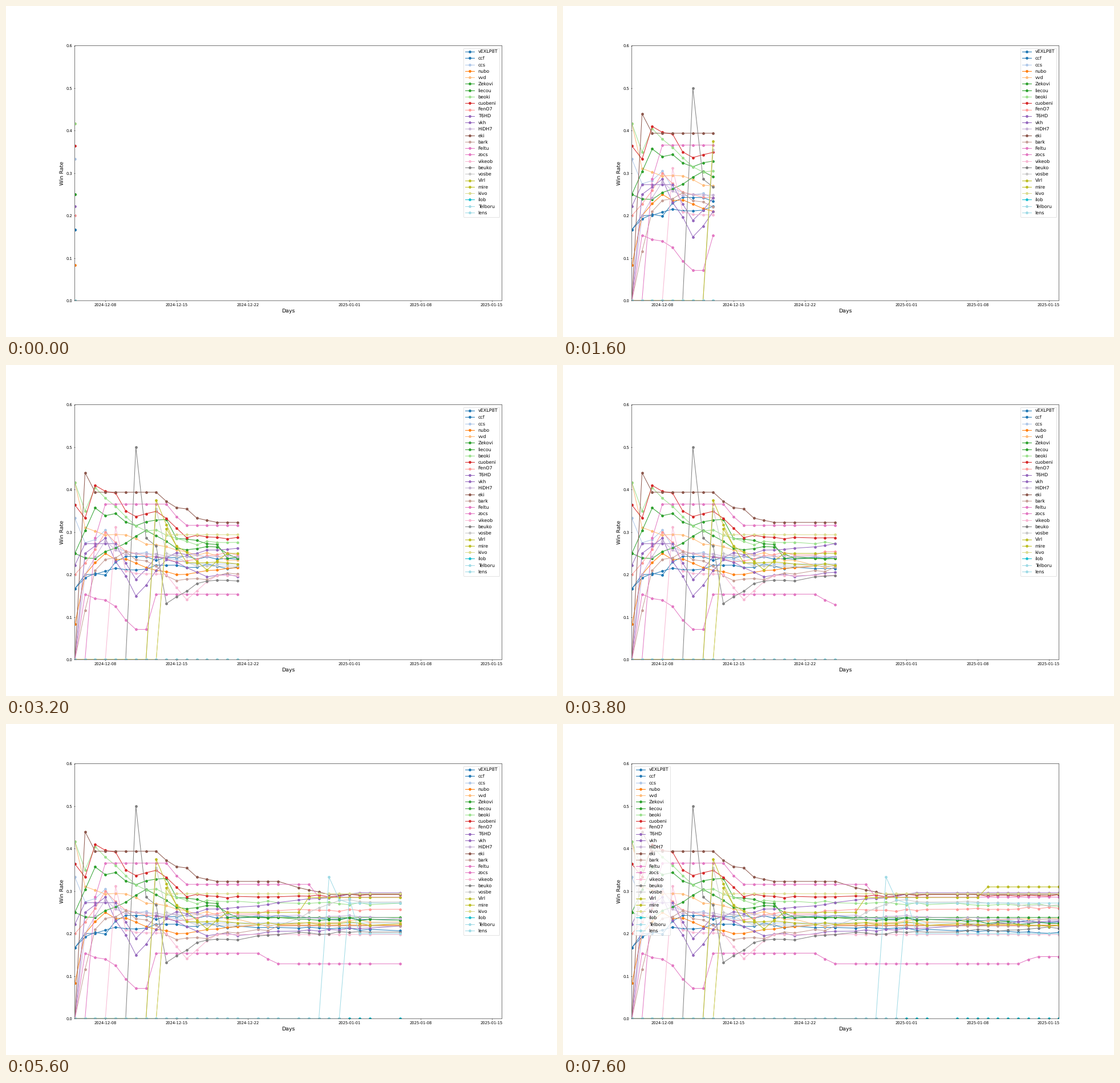
Write a matplotlib script that moves like this. It is 966 px wide and 580 px high and loops after 7800 ms.

```python
import numpy as np
import matplotlib.pyplot as plt
from matplotlib.animation import FuncAnimation

WIDTH, HEIGHT, DPI = 966, 580, 48
TICK_PT, LABEL_PT, LEGEND_PT = 10.06, 14.09, 12.08
ROW_PX = 11.27          # pitch of the legend rows
LEGEND_MOVE = 36        # step at which the legend hops to the left side

plt.rcParams.update({
    "font.family": "DejaVu Sans",
    "font.size": TICK_PT,
    "text.hinting": "no_hinting",
})

# Days since 2024-12-05 on which games were played
DAYS = np.array([d for d in range(43) if d not in (17, 21, 30, 31)])
TICKS = {3: "2024-12-08", 10: "2024-12-15", 17: "2024-12-22",
         27: "2025-01-01", 34: "2025-01-08", 41: "2025-01-15"}

rng = np.random.default_rng(5)
players = []


def player(name, keys):
    """Zero until the first key day, then straight runs between the keys.

    Runs that are not level get a wobble that dies down as games add up.
    """
    days, rates = list(keys), list(keys.values())
    if days[0] > 0:
        days, rates = [days[0] - 1] + days, [0] + rates
    rate = np.interp(DAYS, days, rates)
    moving = (abs(np.gradient(rate, DAYS)) > 1e-6) & (rate > 0)
    moving &= ~np.isin(DAYS, days)
    wobble = rng.normal(0, 0.002 + 0.008 * np.exp(-DAYS / 6))
    players.append((name, rate + wobble * moving))


player("vEXLP8T", {0: .167, 1: .2, 9: .222, 42: .203})
player("ccf", {0: .167, 5: .243, 42: .228})
player("ccs", {0: .333, 1: .275, 3: .305, 4: .265, 12: .225})
player("nubo", {0: .083, 1: .2, 3: .25, 10: .2, 18: .22})
player("vvd", {0: .417, 1: .311, 8: .27, 18: .222, 42: .235})
player("Zekovi", {0: .25, 2: .357, 5: .324, 9: .33, 10: .285, 14: .271, 15: .238, 42: .224})
player("liecou", {0: .25, 2: .238, 7: .304, 10: .262, 14: .265, 16: .238})
player("beoki", {0: .417, 1: .35, 2: .405, 6: .315, 11: .278, 42: .265})
player("cuobeni", {0: .364, 1: .333, 2: .41, 4: .392, 5: .35, 8: .349, 11: .287, 42: .292})
player("FenO7", {0: .2, 3: .3, 5: .255, 10: .23, 15: .252, 42: .26})
player("T6HD", {0: .222, 1: .273, 4: .273, 6: .189, 8: .242, 12: .25, 29: .296})
player("vkh", {1: .25, 3: .286, 6: .15, 9: .235, 13: .195, 42: .23})
player("HiDH7", {1: .2, 3: .28, 5: .247, 42: .233})
player("eki", {1: .44, 2: .394, 8: .394, 12: .333, 14: .323, 20: .323, 25: .292})
player("bark", {1: .116, 2: .21, 5: .254, 10: .186, 20: .218})
player("Feltu", {1: .154, 4: .125, 6: .071, 7: .071, 8: .154, 18: .154, 20: .129,
                 38: .129, 40: .146})
player("zocs", {2: .286, 3: .366, 9: .366, 11: .316, 23: .316, 24: .286})
player("vikeob", {4: .312, 5: .209, 9: .2, 11: .141, 14: .198})
player("beuko", {6: .5, 7: .286, 8: .267, 9: .132, 12: .179, 20: .198, 42: .212})
player("vosbe", {8: .355, 9: .25, 12: .22, 20: .22, 26: .278, 42: .268})
player("Virl", {8: .375, 10: .267, 13: .211, 15: .25, 22: .25, 23: .285, 34: .285, 35: .31})
player("mire", {9: .308, 11: .228, 42: .22})
player("kivo", {9: .294})
player("ilob", {0: 0})
player("Telboru", {25: .333, 26: .28, 27: .272})
player("lens", {27: .283, 28: .2})

fig, ax = plt.subplots(figsize=(WIDTH / DPI, HEIGHT / DPI), dpi=DPI)
fig.subplots_adjust(left=0.125, right=0.9, bottom=0.11, top=0.88)
ax.set_xlim(0, DAYS[-1])
ax.set_ylim(0, 0.6)
ax.set_xticks(list(TICKS), list(TICKS.values()))
ax.set_xlabel("Days", fontsize=LABEL_PT)
ax.set_ylabel("Win Rate", fontsize=LABEL_PT)
for spine in ax.spines.values():
    spine.set_snap(False)

colors = plt.get_cmap("tab20")(np.linspace(0, 1, len(players)))
lines = [ax.plot([], [], marker="o", color=c, label=name)[0]
         for c, (name, _) in zip(colors, players)]


def make_legend(spacing):
    return ax.legend(loc="upper right", fontsize=LEGEND_PT, labelspacing=spacing)


def row_pitch(legend):
    fig.draw_without_rendering()
    tops = [text.get_window_extent().y1 for text in legend.get_texts()]
    return (tops[0] - tops[-1]) / (len(tops) - 1)


# Measure the bare rows, then space them to the wanted pitch
legend = make_legend(0)
legend = make_legend((ROW_PX - row_pitch(legend)) / (LEGEND_PT * DPI / 72))


def update(step):
    n = step + 1
    for line, (_, rate) in zip(lines, players):
        line.set_data(DAYS[:n], rate[:n])
    legend.set_loc("upper left" if step >= LEGEND_MOVE else "upper right")
    return [*lines, legend]


anim = FuncAnimation(fig, update, frames=len(DAYS), interval=200,
                     repeat=True, repeat_delay=0)
plt.show()
```
